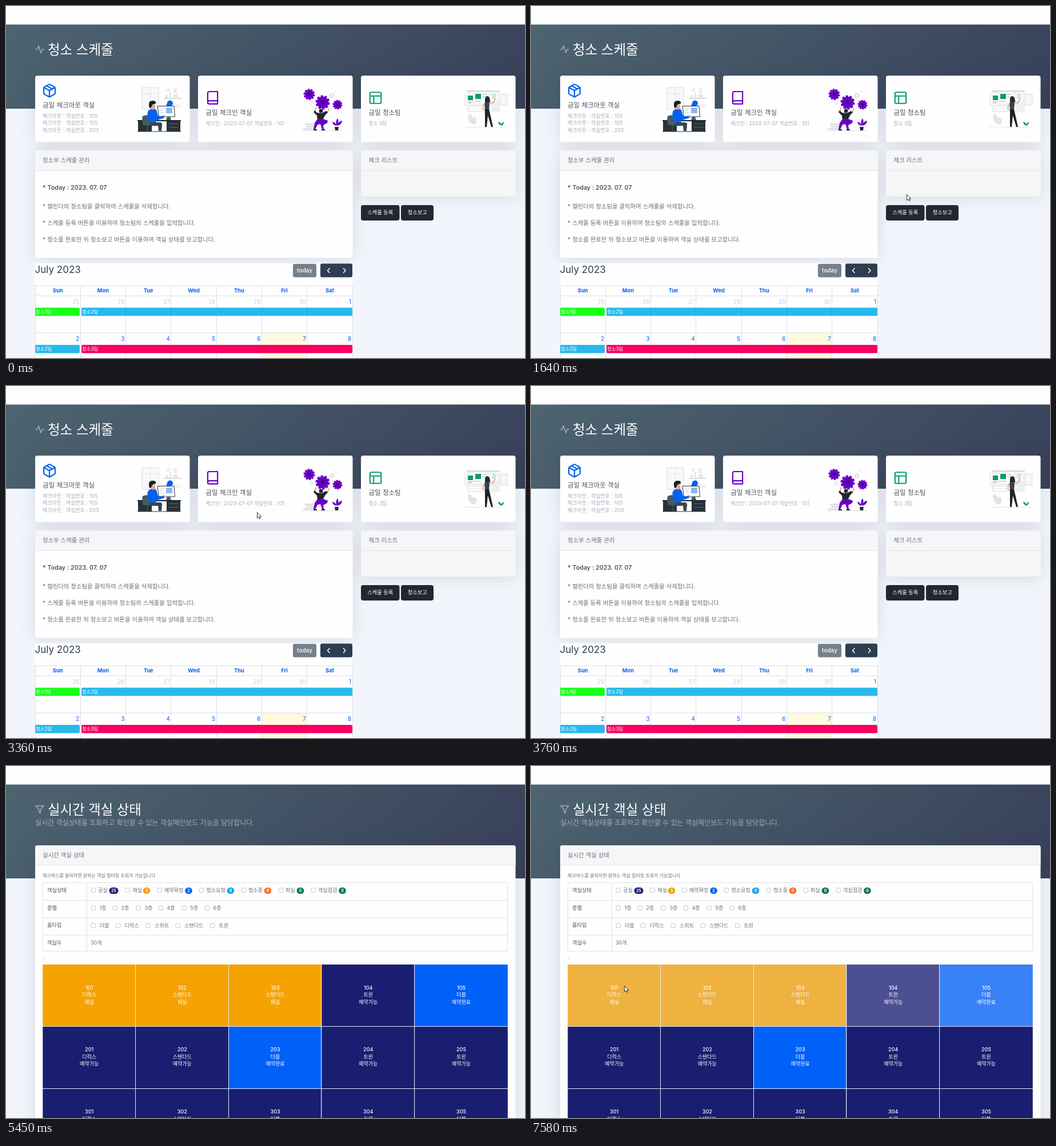
Write an HTML page that moves like this. It is 908 px wide and 617 px high and loops after 8 s.

```html
<!DOCTYPE html>
<html lang="ko">
<head>
<meta charset="utf-8">
<style>
html, body { margin: 0; width: 100%; height: 100%; overflow: hidden; background: #f2f6fc; }
svg { display: block; }
text { font-family: Inter, "Noto Sans CJK KR", "Noto Sans CJK", sans-serif; white-space: pre; }
.cards { filter: drop-shadow(0 2px 15px rgba(33, 40, 50, .14)); }
.icon { fill: none; stroke-width: 2; stroke-linecap: round; stroke-linejoin: round; }
</style>
</head>
<body>
<svg id="stage" width="908" height="617" viewBox="0 0 908 617"></svg>
<script>
const BLUE = '#0061f2', PURPLE = '#6900c7', GREEN = '#0b9a72', DARK = '#263238', SKIN = '#eba68c';
const NAVY = '#1a1e70', ORANGE = '#f6a200', GREY = '#69707a', PALE = '#a7aeb8', LINE = '#e0e3e8';

const rect = (x, y, w, h, fill, r = 0, extra = '') =>
  `<rect x="${x}" y="${y}" width="${w}" height="${h}" rx="${r}" fill="${fill}" ${extra}/>`;
const text = (x, y, size, str, fill, anchor = 'start', weight = 400) =>
  `<text x="${x}" y="${y}" font-size="${size}" fill="${fill}" text-anchor="${anchor}" font-weight="${weight}">${str}</text>`;
const path = (d, fill, stroke = 'none', width = 1) =>
  `<path d="${d}" fill="${fill}" stroke="${stroke}" stroke-width="${width}"/>`;
const circle = (x, y, r, fill) => `<circle cx="${x}" cy="${y}" r="${r}" fill="${fill}"/>`;
const lines = (d, color = LINE) => path(d, 'none', color);
// d is drawn on a 24 unit square, placed by its centre
const icon = (x, y, scale, color, d) =>
  `<path class="icon" transform="translate(${x} ${y}) scale(${scale}) translate(-12 -12)" stroke="${color}" d="${d}"/>`;
const card = (x, y, w, h, head) => rect(x, y, w, h, '#fefefe', 4) +
  (head ? path(`M${x} ${y + 35}v-31q0-4 4-4h${w - 8}q4 0 4 4v31z`, '#f6f6f8') + lines(`M${x} ${y + 35}h${w}`) : '');
const gear = (x, y, r, color, hole = '#fff') =>
  `<circle cx="${x}" cy="${y}" r="${r * .78}" fill="${color}" stroke="${color}" stroke-width="${r * .44}"
    pathLength="80" stroke-dasharray="5 3"/>` + circle(x, y, r * .82, color) + circle(x, y, r * .28, hole);

// Header band in two heights, with the white bar above it
const band = (bottom, id) => {
  const h = bottom - 32.5, d = (908 + h) / 4, cy = 32.5 + h / 2;
  return `<linearGradient id="${id}" gradientUnits="userSpaceOnUse" x1="${454 - d}" y1="${cy - d}" x2="${454 + d}" y2="${cy + d}">
    <stop stop-color="#4d6570"/><stop offset="1" stop-color="#38405a"/></linearGradient>` +
    rect(0, 0, 908, 617, '#f2f6fc') + rect(0, 0, 908, 33, '#fefefe') + rect(0, 32.5, 908, h, `url(#${id})`);
};

function deskScene() {
  return rect(237, 142, 31, 40, '#ececee') + rect(239, 144, 27, 36, '#f8f8f9') +
    lines('M252.5 142v40M237 154h31', '#e4e4e6') +
    path('M279 161v-5h4v5m3 0v-10h3v10m4 0v-6h8v6', '#e6e6e8') + rect(276, 161, 31, 2, '#dcdcde') +
    path('M281 150v-5h3v-3h2v3h1v5zM293 153v-9h6v9z', '#ededee') + path('M280 179v-7h26v7z', '#f3f3f4') +
    circle(287, 170.5, 5, BLUE) + path('M282 170l-2 6 6-1z', BLUE) +
    path('M265 175.5h29l1.5 18.5h-28z', '#fff', DARK, 1) + path('M270 179h8M269 183h7M270 187h6', 'none', '#b8c6d8') +
    rect(280, 178, 11, 10, '#8bb8f4') + path('M282 194h5l2 6h-9z', '#455a64') +
    rect(230, 200, 76, 2, '#1c262b') + rect(231, 202, 24, 18, DARK) + rect(281, 202, 24, 18, DARK) +
    rect(285, 206, 16, 1, '#546a74') + rect(285, 212, 16, 1, '#546a74') +
    path('M239 193q8-4 13 1l3 15h-15q-3-8-1-16z', '#455a64') + path('M246 209h3v10h-3z', '#37474f') +
    path('M248 185q4-6 11-5 5 1 6 9l2 5 10-2v4l-12 4-3 4h-11q-5-10-3-19z', BLUE) +
    path('M252 204h18q4 1 3 5l-1 10h-5l-1-9h-14z', '#37474f') +
    path('M253 173h8v6q-2 4-7 2z', SKIN) + circle(278, 194, 2, SKIN) +
    path('M250 174q-1-8 7-8 6 0 5 5l-6 2-2 5-3 1z', '#17202b') + rect(230, 219.5, 76, 1, DARK);
}

function gearScene() {
  return gear(570, 157, 5, '#e6e6e8') + gear(534, 170, 4, '#ececee') + circle(577, 150, 2, '#ececee') +
    gear(530.5, 155, 10, PURPLE, '#3c0078') + gear(554, 169, 12.5, PURPLE, '#3c0078') + gear(580, 173, 8.5, PURPLE, '#3c0078') +
    path('M523 206h15v3h-15zm2 4h15v3h-15zm-5 4h20v3h-20z', '#e0e0e2') +
    path('M541 184l1-6M562 188l3-9', 'none', SKIN, 2) + circle(551, 184, 3.4, '#20262e') +
    path('M540 183l4 4 8 1 8-4 3 2-5 6-4 8h-9l-1-8-6-6z', '#20262e') +
    path('M545 198h10l8 3-1 4-7 4 1 7h-3l-3-9-5 1-4 8h-3l2-11z', PURPLE) +
    path('M538 216h6v2h-6zm14 0h6v2h-6z', '#20262e') +
    path('M578 210q-6-1-7-7 6 1 7 7zm0 0q-2-8 2-13 4 6-2 13zm1 0q1-7 9-9 0 7-9 9z', PURPLE) +
    path('M575 212h7l-1 6h-5z', '#20262e') + rect(517, 218, 72, .8, '#d5d5d8');
}

function boardScene() {
  return rect(802, 153, 76, 22, '#eceeee') + rect(806, 148, 58, 38, '#eef0f0') + rect(806, 148, 58, 2, '#d5d8da') +
    rect(804, 153, 14, 20, '#f6f7f7') + rect(808, 157, 9, 8, GREEN) + rect(820, 151, 24, 20, '#fafafa') +
    rect(821, 154, 10, 9, GREEN) + path('M821 167h10M833 155h8M833 159h8M808 168h9M808 170h6', 'none', '#aab5b4') +
    rect(848, 152, 13, 14, '#fafafa') + path('M850 155h8M850 158h8M850 161h5', 'none', '#7fc1ad') +
    rect(866, 156, 9, 16, '#f7f7f7') + path('M810 178h42M810 182h30', 'none', '#fff', 2) +
    path('M815 207q-9-6-6-18 5 1 8 7 3-3 5 0 4 8-3 12z', '#e4e4e6') +
    path('M847 171l6-2 3-8', 'none', SKIN, 1.8) + path('M836 172l-2 8 5 4', 'none', SKIN, 1.6) +
    path('M838 169q-1-11 4-11 5 0 5 11z', '#242a31') + path('M837 170q4-3 9 0l-1 12h-7z', '#3a4149') +
    path('M838 181h7l3 13 4 18h-3l-6-20-2 20h-3z', '#1d2329') +
    path('M867 210q-6-2-6-7 6 1 6 7zm0 0q-1-5 4-7 0 5-4 7z', GREEN) + rect(801, 212, 76, .7, '#dcdcde');
}

function schedulePage() {
  const W = 555 / 7, cx = i => 51 + W * i;
  let s = band(180, 'g1') +
    icon(59, 76, .7, 'rgba(255,255,255,.5)', 'M22 12h-4l-3 9L9 3l-3 9H2') +
    text(73, 85, 23.5, '청소 스케줄', '#fff', 'start', 300) +
    '<g class="cards">' + [51, 336, 621].map(x => card(x, 122, 270.5, 116.5)).join('') +
    card(51, 253.5, 555.5, 188, 1) + card(621, 253.5, 270.5, 80.5, 1) + rect(621, 289, 270.5, 45, '#f6f6f7', 4) + '</g>';

  s += icon(76, 148.3, 1.1, BLUE, 'M16.5 9.4 7.5 4.21M21 16V8a2 2 0 0 0-1-1.73l-7-4a2 2 0 0 0-2 0l-7 4A2 2 0 0 0 3 8v8a2 2 0 0 0 1 1.73l7 4a2 2 0 0 0 2 0l7-4A2 2 0 0 0 21 16zM3.27 6.96 12 12.01l8.73-5.05M12 22.08V12') +
    icon(361.5, 160.8, 1.08, PURPLE, 'M4 19.5A2.5 2.5 0 0 1 6.5 17H20M6.5 2H20v20H6.5A2.5 2.5 0 0 1 4 19.5v-15A2.5 2.5 0 0 1 6.5 2z') +
    icon(646.5, 161, 1.08, GREEN, 'M5 3h14a2 2 0 0 1 2 2v14a2 2 0 0 1-2 2H5a2 2 0 0 1-2-2V5a2 2 0 0 1 2-2zM3 9h18M9 21V9');
  [[64, 178.3, '금일 체크아웃 객실'], [349.5, 191.3, '금일 체크인 객실'], [634.5, 191.3, '금일 청소팀']]
    .forEach(([x, y, t]) => s += text(x, y, 11.5, t, '#4a515c'));
  [105, 105, 203].forEach((n, i) => s += text(64, 195.7 + i * 12.7, 9, '체크아웃 : 객실번호 : ' + n, PALE));
  s += text(349.5, 208.5, 8.8, '체크인 : 2023-07-07 객실번호 : 101', PALE) + text(634.5, 208.5, 8.8, '청소 3팀', PALE) +
    deskScene() + gearScene() + boardScene() +
    text(64, 274, 10.4, '청소부 스케줄 관리', GREY) + text(634.5, 274, 10.4, '체크 리스트', GREY) +
    text(64, 321.5, 10.8, '* Today : 2023. 07. 07', '#363d47', 'start', 500);
  ['캘린더의 청소팀을 클릭하여 스케줄을 삭제합니다.', '스케줄 등록 버튼을 이용하여 청소팀의 스케줄을 입력합니다.',
    '청소를 완료한 뒤 청소보고 버튼을 이용하여 객실 상태를 보고합니다.']
    .forEach((t, i) => s += text(64, 355 + i * 29, 10.4, '* ' + t, GREY));
  s += rect(621, 349, 67.5, 27, '#212832', 4) + text(654.7, 365.3, 9.2, '스케줄 등록', '#fff', 'middle') +
    rect(691, 349, 57, 27, '#212832', 4) + text(719.7, 365.3, 9.2, '청소보고', '#fff', 'middle');

  s += rect(51, 451, 555, 166, '#fefefe') + text(50.5, 468, 17, 'July 2023', '#363d47') +
    rect(502, 452, 41, 23.5, '#75808b', 3) + text(522.5, 467, 10, 'today', '#fff', 'middle', 500) +
    rect(550, 451.5, 56, 24, '#2c3e50', 3) +
    path('M566.5 459.5l-4 4.2 4 4.2M590 459.5l4 4.2-4 4.2', 'none', '#fff', 1.5) +
    rect(cx(5), 573, W, 44, '#fff9de');
  let grid = 'M51 490.5H606M51 508H606M51 573H606';
  for (let i = 0; i < 8; i++) grid += `M${Math.floor(cx(i) + .01) + .5} 490V617`;
  s += lines(grid, '#dddfe2');
  ['Sun', 'Mon', 'Tue', 'Wed', 'Thu', 'Fri', 'Sat'].forEach((d, i) => {
    s += text(cx(i) + W / 2, 502.3, 9.3, d, BLUE, 'middle', 700) +
      text(cx(i + 1) - 2, 521.5, 9.8, i < 6 ? 25 + i : 1, i < 6 ? '#b7d3f3' : BLUE, 'end') +
      text(cx(i + 1) - 2, 586.5, 9.8, i + 2, BLUE, 'end');
  });
  const event = (x, y, w, color, n) => rect(x, y, w, 14.5, color, 2) + text(x + 1, y + 10, 8.4, `청소${n}팀`, '#fff');
  return s + event(51, 528.7, 78, '#1aff1a', 1) + event(132, 528.7, 474, '#28b9ec', 2) +
    event(51, 594, 78, '#28b9ec', 2) + event(132, 594, 474, '#f80061', 3) +
    `<g id="drawer">${rect(-40, -10, 56.5, 88.5, '#f2f6fc', 4, 'stroke="#5d6878"')}` +
    rect(-40, 0, 56.5, 15, '#3a425e') + '</g>';
}

function roomsPage() {
  const W = 813.5 / 5, H = 108.7;
  let s = band(197, 'g2') +
    icon(59, 76, .7, 'rgba(255,255,255,.5)', 'M22 3H2l8 9.46V19l4 2v-8.54z') +
    text(73, 85, 23.4, '실시간 객실 상태', '#fff', 'start', 300) +
    text(51, 104, 12, '실시간 객실상태를 조회하고 확인할 수 있는 객실메인보드 기능을 담당합니다.', 'rgba(255,255,255,.5)') +
    `<g class="cards">${card(51, 139, 840.5, 500, 1)}</g>` + text(64, 160, 10.4, '실시간 객실 상태', GREY) +
    text(64, 195, 8, '체크박스를 클릭하면 원하는 객실 필터링 조회가 가능합니다', GREY) +
    lines('M64.5 204.5h813v120h-813zM64 235.5h813M64 266.5h813M64 296.5h813M141.5 204v120');
  ['객실상태', '층별', '룸타입', '객실수'].forEach((t, i) => s += text(72, 220.7 + i * 30.8, 9.2, t, '#4b5362', 'start', 500));
  s += text(148, 313, 9, '30개', GREY) + text(64.5, 339, 8, '.', GREY);

  const check = (x, y, tx, t) => rect(x, y, 7.5, 7.5, '#fff', 1.8, 'stroke="#b9bfc8" stroke-width=".9"') + text(tx, y + 7, 9.1, t, GREY);
  [[149, 161, '공실', 188.5, 25, NAVY], [209, 221.5, '재실', 246, 3, '#f0a010'], [265, 277, '예약확정', 319.5, 2, BLUE],
    [338, 350.5, '청소요청', 393, 0, '#0aa5e4'], [412, 424, '청소중', 458, 0, '#f76b2a'],
    [477, 489, '퇴실', 515, 0, '#0a7050'], [534, 546, '객실점검', 588.5, 0, '#0a7050']].forEach(([x, tx, t, bx, n, c]) => {
    const w = n > 9 ? 16 : 12.5;
    s += check(x, 214, tx, t) + rect(bx - w / 2, 213, w, 11, c, 5.5) + text(bx, 221, 7, n, '#fff', 'middle', 700);
  });
  [149, 187, 228, 267, 308, 348].forEach((x, i) => s += check(x, 245, x + 14.5, i + 1 + '층'));
  [[149, '더블'], [192.5, '디럭스'], [245, '스위트'], [297, '스탠다드'], [357.5, '트윈']]
    .forEach(([x, t]) => s += check(x, 276, x + 15, t));

  const types = [['디럭스', '스탠다드', '스탠다드', '트윈', '더블'], ['디럭스', '스탠다드', '더블', '트윈', '트윈'],
    ['디럭스', '스탠다드', '더블', '트윈', '더블']];
  const states = ['OOOFB', 'FFBFF', 'FFFFF'];
  const look = { O: [ORANGE, '재실'], F: [NAVY, '예약가능'], B: ['#0061f8', '예약완료'] };
  let cells = '', labels = '', grid = '';
  types.forEach((row, r) => row.forEach((type, c) => {
    const x = 64.3 + c * W, y = 348 + r * H, [color, state] = look[states[r][c]];
    cells += rect(x, y, W, H, color);
    if (c) grid += `M${Math.round(x) - .5} 348V617`;
    [(r + 1) * 100 + c + 1, type, state].forEach((t, i) =>
      labels += text(x + W / 2, y + 43.5 + i * 12.6, 9, t, '#fff', 'middle', i ? 400 : 500));
  }));
  grid += 'M64 456.5h814M64 565.5h814';
  return s + cells + `<g id="hover">${rect(64.3, 348, 813.5, H, '#d8d8ee')}</g>` + lines(grid, '#e4e8f4') + labels;
}

const $ = id => document.getElementById(id);
$('stage').innerHTML = `<g id="schedule">${schedulePage()}</g><g id="rooms">${roomsPage()}</g>` +
  `<g id="cursor">${path('M.5.5v10.2l2.4-2.2 1.6 3.4 1.6-.8-1.5-3.2h3.1z', '#fff', '#222', .9)}</g>`;

// Pointer tracks: [time, x, y]; the pointer shows only while a track runs
const tracks = [
  [[130, 843, 548], [200, 800, 495], [490, 650, 314], [820, 650, 314], [1000, 672, 291], [1250, 640, 302], [1570, 656, 327],
    [1640, 657, 330], [1950, 643, 318], [2180, 661, 314], [2400, 655, 322], [2950, 655, 322], [3360, 440, 222], [3700, 110, 16], [3760, 110, 16]],
  [[5780, 39, 31], [6150, 190, 205], [6530, 304, 345], [6600, 302, 344], [7010, 241, 347], [7370, 166, 385], [7440, 165, 385], [7580, 163, 385], [8000, 163, 385]]
];
const clamp = v => Math.min(1, Math.max(0, v));

function pointer(t) {
  const track = tracks.find(k => t >= k[0][0] && t < k[k.length - 1][0]);
  if (!track) return null;
  const i = track.findIndex(k => k[0] > t), [t0, x0, y0] = track[i - 1], [t1, x1, y1] = track[i];
  const p = (t - t0) / (t1 - t0);
  return [Math.round(x0 + (x1 - x0) * p), Math.round(y0 + (y1 - y0) * p)];
}

function draw(now) {
  const t = now % 8000, first = t < 5450, pos = pointer(t);
  $('schedule').style.display = first ? '' : 'none';
  $('rooms').style.display = first ? 'none' : '';
  $('drawer').style.display = t < 5040 ? 'none' : '';
  $('drawer').setAttribute('transform', `translate(${-17 * (1 - clamp((t - 4980) / 270)) ** 2} 0)`);
  $('hover').setAttribute('opacity', .264 * clamp((t - 7050) / 320));
  $('cursor').style.display = pos ? '' : 'none';
  if (pos) $('cursor').setAttribute('transform', `translate(${pos})`);
}

const start = performance.now();
function tick() {
  draw(performance.now() - start);
  requestAnimationFrame(tick);
}
tick();
</script>
</body>
</html>
```
